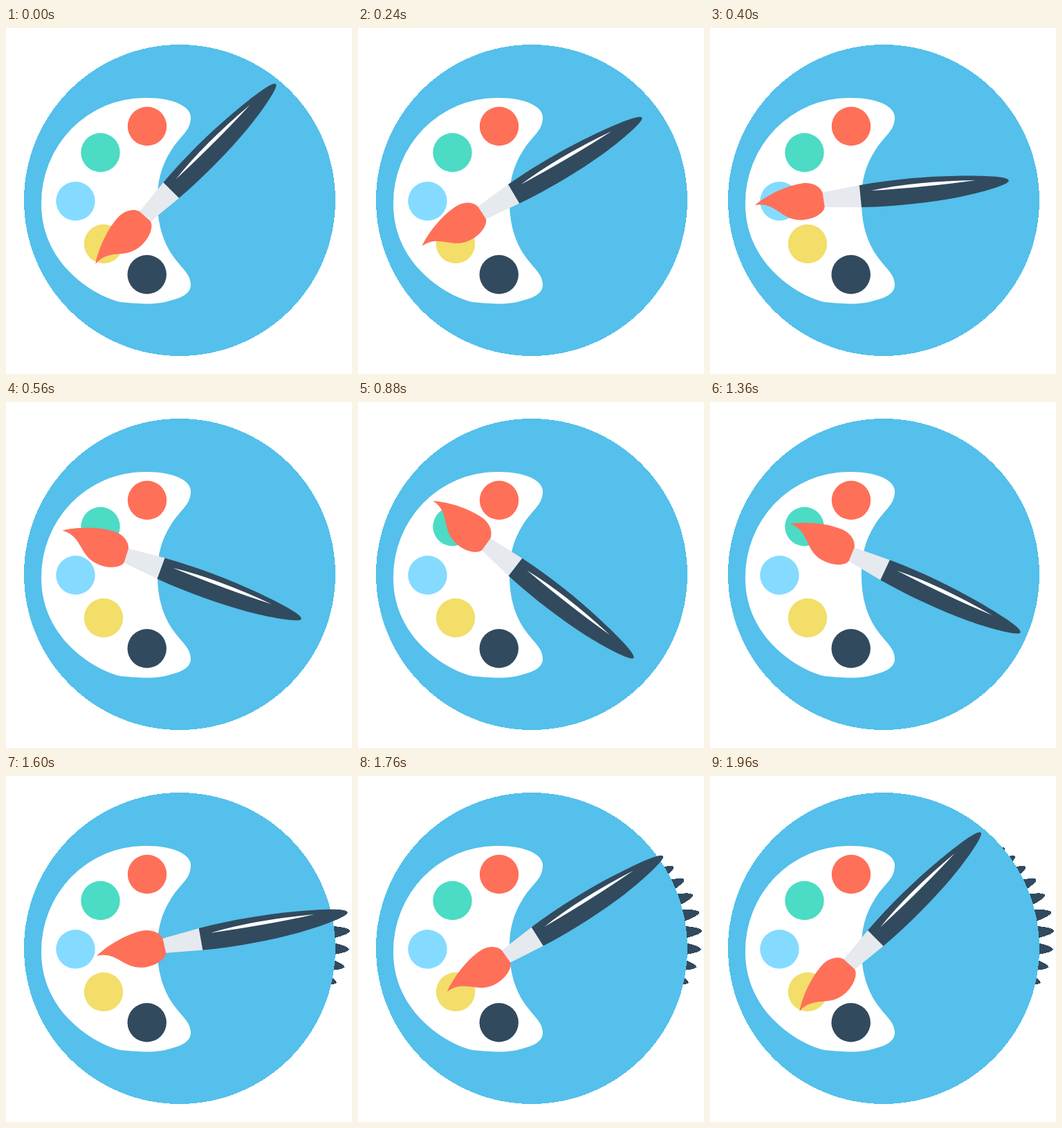
An HTML page for the animation above (2 s loop, 500 px wide and 500 px high).

```html
<!DOCTYPE html>
<html lang="en">
<head>
<meta charset="utf-8">
<title>Paint palette</title>
<style>
  html, body { margin: 0; width: 100%; height: 100%; overflow: hidden; background: #fff; }
  svg { display: block; width: 100%; height: 100%; }
</style>
</head>
<body>
<svg viewBox="0 0 500 500">
  <defs>
    <path id="handle" fill="#324a5e" d="M0-16C50-20 100-19 140-15.6 175-12.5 215.5-8 215.5-1 215.5 4.5 176 12 140 15.5 100 19 50 20 0 16Z"/>
  </defs>
  <g id="trail" shape-rendering="crispEdges"></g>
  <circle cx="251" cy="249" r="225" fill="#54c0eb" shape-rendering="crispEdges"/>
  <path fill="#fff" d="M200 101C240 100 268 113 267 130 266 150 253 154 238 178 224 200 218 224 219 252 219 285 228 314 247 337 257 350 267 357 267 372 266 386 249 391 237 394 222 399 202 400 165 396 150 393 128 382 112 370 72 340 51 300 51 254A149.5 152 0 0 1 200 101Z"/>
  <g id="paints"></g>
  <g id="brush">
    <path fill="#e6e9ee" d="M.5-16L-54-10.7V10.7L.5 16Z"/>
    <path fill="#ff7058" d="M-54-11C-58-23-72-27.5-82-26.8-105-26-136-14-152.6-2.3-121-5-118 25.5-85 25.8-68 26-54 18-53 10Z"/>
    <use href="#handle"/>
    <path fill="#fff" d="M16-6.5Q80-14 168-6.5 100-3.5 16-6.5Z"/>
  </g>
</svg>
<script>
const NS = 'http://www.w3.org/2000/svg';
const LOOP = 2000, STEP = 40;
const OUT_END = 824, BACK_START = 1120, TRAIL_START = 1400;
const SWING = 83, REST_ANGLE = -45.1;

const byId = id => document.getElementById(id);
function add(parent, tag, attrs) {
  const el = document.createElementNS(NS, tag);
  for (const key in attrs) el.setAttribute(key, attrs[key]);
  return byId(parent).appendChild(el);
}

[[204, 142, '#ff7058'], [136.5, 180, '#4cdbc4'], [100.5, 250.3, '#84dbff'],
 [141, 312, '#f2de68'], [203.7, 356.2, '#324a5e']]
  .forEach(([cx, cy, fill]) => add('paints', 'circle', { cx, cy, r: 28.2, fill }));

// cubic-bezier(.42, 0, .58, 1)
function easeInOut(x) {
  if (x <= 0 || x >= 1) return x <= 0 ? 0 : 1;
  let lo = 0, hi = 1, s = 0.5;
  for (let i = 0; i < 24; i++) {
    s = (lo + hi) / 2;
    const bx = 1.26 * s * (1 - s) ** 2 + 1.74 * s * s * (1 - s) + s ** 3;
    if (bx < x) lo = s; else hi = s;
  }
  return s * s * (3 - 2 * s);
}

// Swings out bowing left, returns bowing right.
function pose(t) {
  const back = t > BACK_START;
  const q = easeInOut(back ? (t - BACK_START) / (LOOP - BACK_START) : t / OUT_END);
  const swing = back ? 1 - q : q;
  const bow = Math.sin(Math.PI * q), skew = Math.sin(2 * Math.PI * q);
  const x = 238.7 - 11.3 * swing + (back ? 49.5 * bow + skew : -15.4 * bow - 3.85 * skew);
  const y = 234.5 + 4 * swing + (back ? 2 * bow + 4.8 * skew : 6.5 * bow + 1.3 * skew);
  return `translate(${x} ${y}) rotate(${REST_ANGLE + SWING * swing})`;
}

// Handle tips outside the disc stay visible until the loop restarts.
const ghosts = [];
for (let time = TRAIL_START; time < LOOP; time += STEP) {
  ghosts.push({ time, el: add('trail', 'use', { href: '#handle', transform: pose(time) }) });
}

function render(ms) {
  const t = Math.floor((ms % LOOP) / STEP) * STEP;
  byId('brush').setAttribute('transform', pose(t));
  for (const { time, el } of ghosts) el.setAttribute('visibility', time <= t ? 'visible' : 'hidden');
}

const start = performance.now();
function tick() {
  render(performance.now() - start);
  requestAnimationFrame(tick);
}
tick();
</script>
</body>
</html>
```
